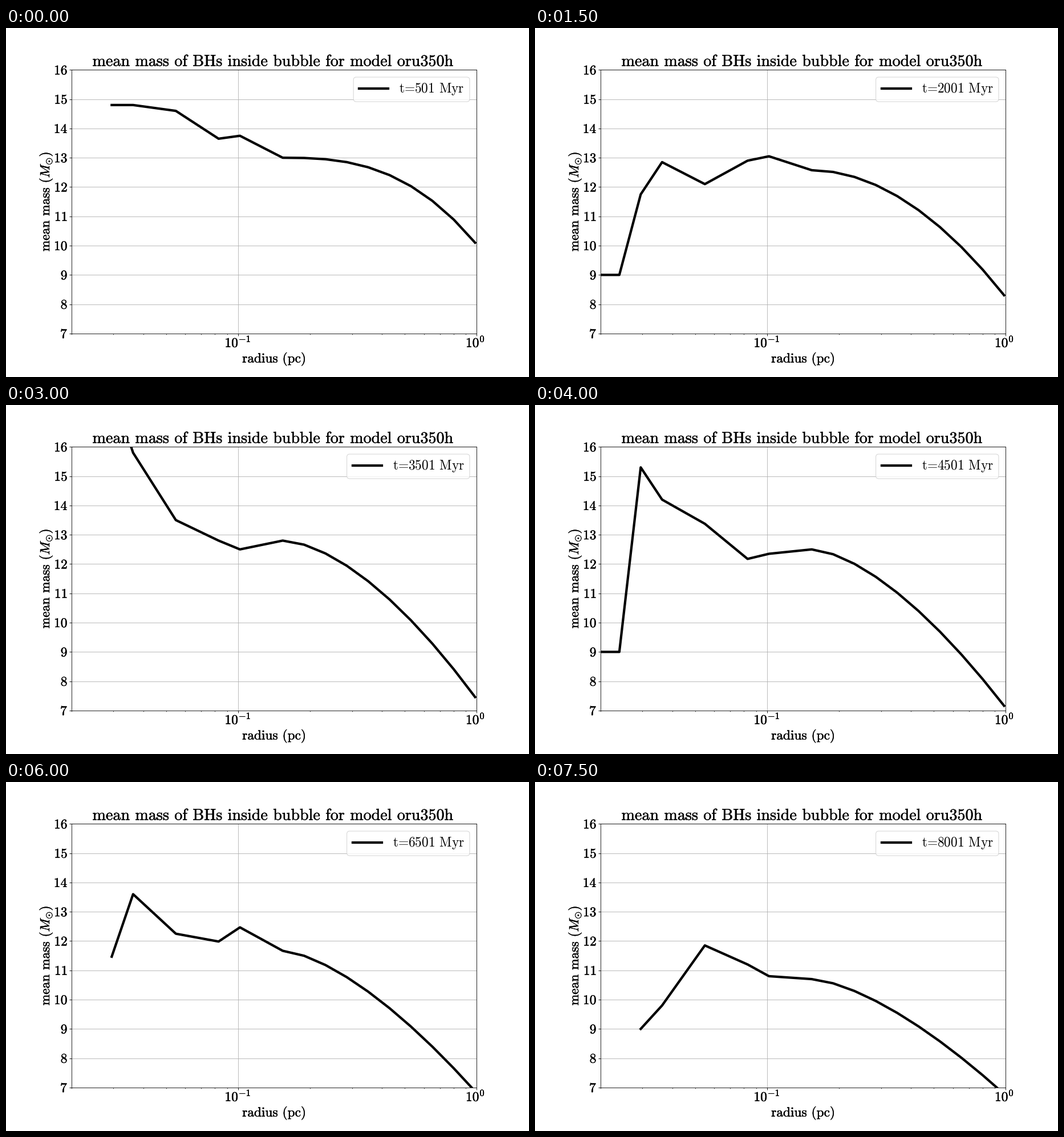
These frames come from a looping animation (917x611 px, 8 s). A matplotlib script:

```python
import numpy as np
import matplotlib.pyplot as plt
from matplotlib.animation import FuncAnimation
from matplotlib.patches import FancyBboxPatch
from matplotlib.patheffects import withStroke

W, H, DPI = 917, 611, 64
PT = 72 / DPI            # points per pixel
FONT = 23.4              # text size in pixels
GAP = r"\hspace{0.38}"   # word space

plt.rcParams["mathtext.fontset"] = "cm"

# Key points of the jagged inner part: mean mass at a few radius bins
BINS = [0, 1, 3, 5, 6, 8]
INNER = {
    0: [14.8, 14.8, 14.6, 13.65, 13.75, 13.0],
    2: [14.0, 14.3, 12.1, 13.1, 13.2, 12.9],
    4: [9.5, 11.4, 12.1, 12.7, 12.9, 12.25],
    6: [18, 15.8, 13.5, 12.8, 12.5, 12.8],
    10: [12.6, 12.6, 13.25, 11.55, 12.2, 12.2],
    13: [10.9, 14.1, 11.75, 12.2, 12.6, 11.4],
    15: [9.0, 9.8, 11.85, 11.2, 10.8, 10.7],
}


def curve(i):
    """Radii and mean masses at step i."""
    points = [np.interp(i, list(INNER), col) for col in zip(*INNER.values())]
    k = np.arange(18)
    mass = np.interp(k, BINS, points)
    # The outer part falls off as a power law that sinks and straightens with time
    drop = mass[-1] - (6.7 + 3.4 * np.exp(-i / 4))
    s = np.clip((k - BINS[-1]) / 9, 0, 1)
    mass -= drop * s ** (1.5 + 1.2 * np.exp(-i / 3))
    # Every fifth step a light object fills the two innermost bins
    if i % 5 == 3:
        k = np.arange(-2, 18)
        mass = np.concatenate([[9, 9], mass])
    return 10 ** (-0.0067 - 0.0896 * (17 - k)), mass


def roman(s):
    s = s.replace("=", r"\hspace{-0.2}=\hspace{-0.2}")
    return r"\mathrm{%s}" % s.replace(" ", GAP)


fig = plt.figure(figsize=(W / DPI, H / DPI), dpi=DPI, facecolor="white")

# Plot area
left, right, top, bottom = 0.125 * W, 0.9 * W, 0.12 * H, 534.8
ax = fig.add_axes([left / W, 1 - bottom / H, (right - left) / W, (bottom - top) / H])
ax.set_xscale("log")
ax.set_xlim(0.02, 1)
ax.set_ylim(7, 16)
ax.set_yticks(range(7, 17))
ax.grid(color="#b0b0b0", lw=0.85 * PT)
ax.set_axisbelow(True)
ax.tick_params(which="both", labelleft=False, labelbottom=False)
ax.tick_params(which="major", length=3.7 * PT, width=0.85 * PT)
ax.tick_params(which="minor", length=2.1 * PT, width=0.64 * PT)
for spine in ax.spines.values():
    spine.set_linewidth(0.85 * PT)
line, = ax.plot([], [], color="black", lw=4.24 * PT)

# Pixel layer for text and legend
stage = fig.add_axes([0, 0, 1, 1])
stage.set_xlim(0, W)
stage.set_ylim(H, 0)
stage.axis("off")
BOLDER = [withStroke(linewidth=0.45 * PT, foreground="black")]


def label(x, y, math, size=FONT, ha="center", effects=BOLDER, **kw):
    return stage.text(x, y, f"${math}$", fontsize=size * PT, ha=ha, va="baseline",
                      color="black", path_effects=effects, **kw)


label(468.5, 66.5, roman("mean mass of BHs inside bubble for model oru350h"), FONT * 1.2)
label(470, 585.5, roman("radius (pc)"))
label(76, 304, roman("mean mass (") + r"M_{\odot}" + roman(")"),
      rotation=90, rotation_mode="anchor")
for v in range(7, 17):
    label(108.5, bottom - (v - 7) * (bottom - top) / 9 + 8, roman(str(v)), ha="right")
label(383.5, 558.5, "10^{-1}", ha="left")
label(806, 558.5, "10^{0}", ha="left")

frame = FancyBboxPatch((0, 0), 1, 1, boxstyle="round,pad=0,rounding_size=5",
                       fc=(1, 1, 1, 0.8), ec=(0.8, 0.8, 0.8, 0.8), lw=1.06 * PT)
stage.add_patch(frame)
handle, = stage.plot([], [], color="black", lw=4.24 * PT)
caption = label(803.5, 113.5, roman("t"), ha="right", effects=None)


def update(i):
    line.set_data(*curve(i))
    t = 501 + 500 * i
    x = 644 - 11.6 * len(str(t))
    frame.set_bounds(x, 86, 813 - x, 43)
    handle.set_data([x + 10, x + 61], [105.5, 105.5])
    caption.set_text(f"${roman(f't={t} Myr')}$")
    return line, frame, handle, caption


anim = FuncAnimation(fig, update, frames=16, interval=500, repeat=True,
                     repeat_delay=0, blit=False)
plt.show()
```
